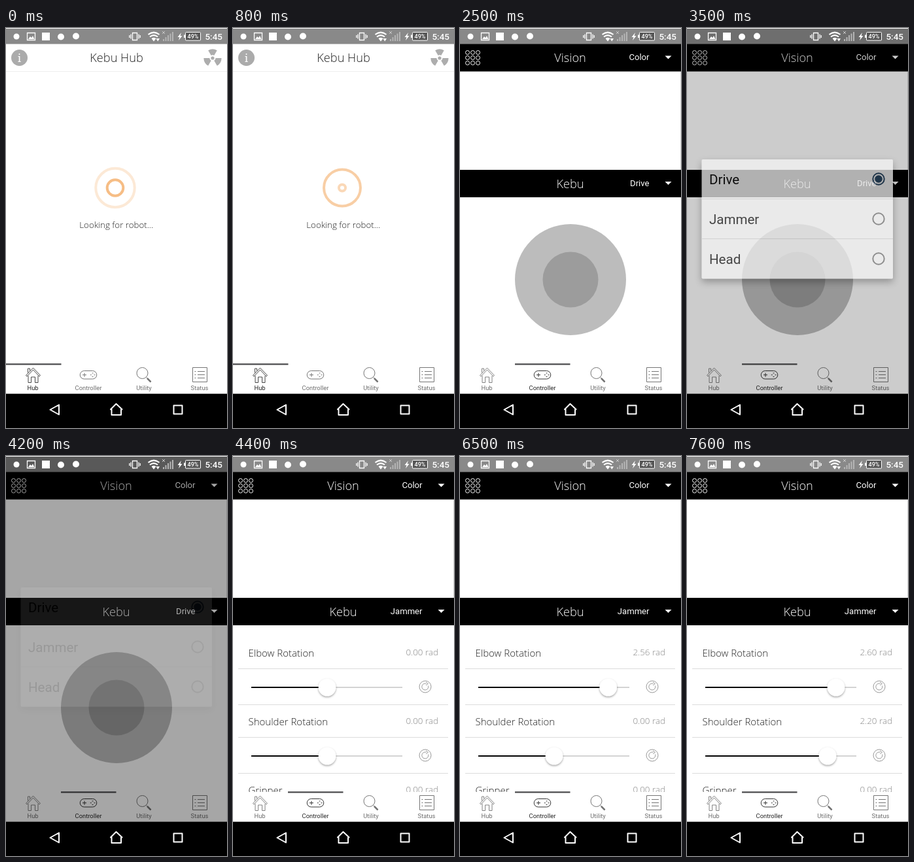
Write an HTML page that moves like this. It is 338x612 px and loops after 7.7 s.

```html
<!DOCTYPE html>
<html lang="en">
<head>
<meta charset="utf-8">
<title>Robot hub</title>
<style>
  html, body { margin: 0; width: 100%; height: 100%; overflow: hidden; background: #fff; }
  svg { display: block; width: 100vw; height: 100vh; }
  text { font-family: "Open Sans", sans-serif; font-weight: 300; font-size: 15px; fill: #222; }
  .roboto { font-family: Roboto, sans-serif; font-weight: 400; font-size: 13.1px; }
  .title { font-size: 18.2px; text-anchor: middle; }
  .value { font-size: 13.4px; fill: #8a8a8a; text-anchor: end; }
  .white { fill: #fff; }
  .end { text-anchor: end; }
  .outline { fill: none; stroke: #fff; }
  .rule { stroke: #dcdcdc; }
  .tab text { font-size: 9.4px; text-anchor: middle; fill: #6c6c6c; }
  .tab path { fill: none; stroke: #757575; }
  .tab.active text { fill: #222; }
  .tab.active path { stroke: #333; }
  #dialog text { font-size: 20.5px; fill: #111; }
</style>
</head>
<body>
<svg viewBox="0 0 338 612">
  <defs>
    <filter id="thumbShadow" x="-50%" y="-50%" width="200%" height="200%">
      <feDropShadow dx="0" dy="1.5" stdDeviation="1.5" flood-opacity=".4"/>
    </filter>
    <filter id="dialogShadow" x="-20%" y="-20%" width="140%" height="150%">
      <feDropShadow dx="0" dy="5" stdDeviation="6" flood-opacity=".4"/>
    </filter>
    <path id="caret" d="M-5 0H5L0 5Z" fill="#fff"/>
    <g id="reset" fill="none" stroke="#999">
      <circle r="9"/>
      <path d="M4.6 -1.5A5 5 0 1 1 1.5 -4.7M1 -7L4.5 -4.6L1.2 -2.2"/>
    </g>
  </defs>

  <rect width="338" height="612" fill="#fff"/>

  <g id="hub">
    <path class="rule" d="M0 66.5H338" style="stroke:#eee"/>
    <circle cx="20.5" cy="45.5" r="12.5" fill="#ababab"/>
    <text x="20.5" y="51.5" class="white" style="font:17px 'Noto Serif',serif;text-anchor:middle">i</text>
    <g id="fan" fill="#adadad" transform="translate(316 46)"><circle r="2.6"/></g>
    <text x="169" y="52" class="title">Kebu Hub</text>
    <g id="search">
      <g fill="none" stroke="#f09134" stroke-width="4">
        <circle class="ripple" cx="167" cy="244.5"/>
        <circle class="ripple" cx="167" cy="244.5"/>
      </g>
      <text x="168.7" y="305.5" text-anchor="middle" style="font-size:13.3px">Looking for robot...</text>
    </g>
    <g id="device">
      <text x="23.5" y="114">Kebu</text>
      <text x="23.5" y="133" style="font-size:13.2px;fill:#444">74:E5:43:21:97:88</text>
      <rect x="227" y="99.5" width="72" height="21" rx="10.5" fill="#ef473a"/>
      <text x="263.5" y="114" text-anchor="middle" class="white" style="font-size:13.3px;font-weight:400">Class 268</text>
      <path class="rule" d="M9 156.5H329M9 194.5H329" style="stroke:#d2d2d2"/>
      <text x="17.8" y="181" fill="#333">Paired</text>
      <text x="173.5" y="181">Connected</text>
      <rect x="145.5" y="166.5" width="18" height="18" rx="3.5" fill="#33cd5f" stroke="#2bac50"/>
      <rect x="301.5" y="166.5" width="18" height="18" rx="3.5" fill="#ef473a" stroke="#c93c31"/>
    </g>
  </g>

  <g id="controller">
    <path d="M0 24H338V66.5H0ZM0 217H338V259H0Z"/>
    <path class="rule" d="M337.5 67V217"/>
    <g id="grid" class="outline"></g>
    <text x="168.5" y="52" class="title white">Vision</text>
    <text x="168.5" y="244.5" class="title white">Kebu</text>
    <text x="289.5" y="49" class="roboto white end">Color</text>
    <text id="mode" x="289.5" y="242" class="roboto white end"></text>
    <use href="#caret" x="318.5" y="42.5"/>
    <use href="#caret" x="318.5" y="235"/>
    <g id="joystick">
      <circle cx="169" cy="385" r="85" fill="#bcbcbc"/>
      <circle cx="169" cy="385" r="42.5" fill="#9c9c9c"/>
    </g>
    <g id="joints"></g>
  </g>

  <g id="tabs">
    <rect y="514" width="338" height="46" fill="#fff"/>
    <g class="tab">
      <path stroke-width=".9" d="M30.5 531.5L41.5 520L52.5 531.5L51 533L41.5 523L32 533ZM34 532V542.5H38.5V534H44.5V542.5H49V532M33.5 527.5V521H36.5V524.5"/>
      <text class="roboto" x="41" y="554">Hub</text>
    </g>
    <g class="tab">
      <path d="M119.5 524.5H132.5A6.25 6.25 0 0 1 132.5 537H119.5A6.25 6.25 0 0 1 119.5 524.5ZM117 530.75H123M120 527.75V533.75M131.5 528H133.5M131.5 533.5H133.5M128.8 530.75H130.8M134.5 530.75H136.5"/>
      <text class="roboto" x="126" y="554">Controller</text>
    </g>
    <g class="tab">
      <path d="M200 528A8.5 8.5 0 1 1 217 528A8.5 8.5 0 1 1 200 528ZM214.5 534.5L221.5 541.5"/>
      <path d="M216 536L221.5 541.5" stroke-width="2.5"/>
      <text class="roboto" x="211" y="554">Utility</text>
    </g>
    <g class="tab">
      <path d="M285.5 519.5H307.5V541.5H285.5ZM288.5 525.5H290.5M293 525.5H304M288.5 530.5H290.5M293 530.5H304M288.5 535.5H290.5M293 535.5H304"/>
      <text class="roboto" x="296" y="554">Status</text>
    </g>
    <rect id="marker" y="513.3" width="84.5" height="2.2" fill="#48484a"/>
  </g>

  <rect y="1" width="338" height="23.5" fill="#898989"/>
  <rect id="dim" y="1" width="338" height="559"/>

  <g id="statusIcons">
    <g fill="#fff">
      <circle cx="16" cy="13" r="4.5"/>
      <rect x="55" y="7" width="12" height="12"/>
      <circle cx="84" cy="13.5" r="5"/>
      <circle cx="107" cy="12.5" r="5"/>
      <path d="M34 17L37 13L39 15L41 12L43.5 17Z"/>
      <path d="M268 7L262.5 14H265.5L264 19L269.5 12H266.5Z"/>
      <path d="M222.5 16Q226 13.5 229.5 16L226 20.5ZM229.5 16H235L232.2 20.5Z"/>
    </g>
    <path class="outline" d="M217.5 10Q226 3.5 234.500 10M220 13.5Q226 8.8 232 13.5" stroke-width="2.2"/>
    <path d="M240 20V17H242V20ZM243.5 20V14H245.5V20ZM247 20V11H249V20ZM250.5 20V8.5H252.5V20ZM254 20V6H256V20Z" fill="#b5b5b5"/>
    <path d="M239 5L243 9M243 5L239 9" stroke="#c8c8c8"/>
    <path class="outline" d="M32.5 7.5H44.5V18.5H32.5ZM193.5 7.5H200.5V18.5H193.5ZM191 9.5V16.5M203 9.5V16.5M188.8 11V15M205.2 11V15" stroke-width="1.3"/>
    <rect x="274.5" y="6.5" width="23" height="12.5" rx="1" fill="#555" stroke="#fff"/>
    <rect x="272" y="10.5" width="2" height="4.5" fill="#fff"/>
    <text x="286" y="16.2" text-anchor="middle" class="roboto white" style="font-size:9px;font-weight:500">49%</text>
    <text x="331" y="18" class="roboto white end" style="font-size:13.5px;font-weight:500">5:45</text>
  </g>

  <g id="dialog">
    <rect x="22.5" y="201" width="292.5" height="182.5" rx="2" fill="#f6f6f6" filter="url(#dialogShadow)"/>
    <path d="M23 261.5H315M23 322.5H315" stroke="#d5d5d5"/>
  </g>

  <rect y="559.6" width="338" height="52.4"/>
  <path class="outline" d="M67.5 584L81 576.5V591.5ZM160 583.5L168.5 575L177.5 583.5H176V592H161.5V583.5ZM256.5 577.5H269.5V590.5H256.5Z" stroke-width="2" stroke-linejoin="round"/>
</svg>

<script>
const LOOP = 7700, STEP = 100;
const $ = id => document.getElementById(id);
const show = (id, on) => { $(id).style.display = on ? '' : 'none'; };
const append = (id, markup) => $(id).insertAdjacentHTML('beforeend', markup);

// Linear interpolation through [time, value] pairs.
function track(t, keys) {
  const next = keys.findIndex(key => key[0] > t);
  if (next < 0) return keys[keys.length - 1][1];
  if (next === 0) return keys[0][1];
  const [t0, v0] = keys[next - 1], [t1, v1] = keys[next];
  return v0 + (v1 - v0) * (t - t0) / (t1 - t0);
}

function bezierEase(x, x1, y1, x2, y2) {
  const curve = (s, a, b) => 3 * s * (1 - s) ** 2 * a + 3 * s * s * (1 - s) * b + s ** 3;
  let low = 0, high = 1;
  for (let i = 0; i < 20; i++) {
    const mid = (low + high) / 2;
    if (curve(mid, x1, x2) < x) low = mid; else high = mid;
  }
  return curve(low, y1, y2);
}

for (const angle of [30, 150, 270]) {
  append('fan', `<path transform="rotate(${angle})" d="M4 -2.3L11.8 -6.8A13.6 13.6 0 0 1 11.8 6.8L4 2.3A4.6 4.6 0 0 0 4 -2.3Z"/>`);
}
for (let i = 0; i < 9; i++) {
  append('grid', `<circle cx="${11.5 + i % 3 * 8}" cy="${37.5 + Math.floor(i / 3) * 8}" r="3"/>`);
}

['Elbow Rotation', 'Shoulder Rotation', 'Gripper'].forEach((name, i) => {
  append('joints', `<g transform="translate(0 ${i * 105})">
    <text x="23.5" y="306.5">${name}</text>
    <text class="value" x="314" y="305">0.00 rad</text>
    <path class="rule" d="M8 325.5H329M8 380.5H329"/>
    <path d="M28 354H259" stroke="#c4c4c4" stroke-width="1.6"/>
    <path class="fill" d="M28 354H144" stroke="#000" stroke-width="2"/>
    <circle class="thumb" cx="144" cy="354" r="13.3" fill="#fff" filter="url(#thumbShadow)"/>
    <use href="#reset" x="294" y="353"/>
  </g>`);
});

['Drive', 'Jammer', 'Head'].forEach((name, i) => {
  const y = 231 + i * 61, color = i ? '#777' : '#2c4a66';
  append('dialog', `<text class="roboto" x="34" y="${y + 8}">${name}</text>
    <circle cx="293" cy="${y}" r="8.7" fill="none" stroke="${color}" stroke-width="2"/>`);
  if (!i) append('dialog', `<circle cx="293" cy="${y}" r="5.8" fill="${color}"/>`);
});

const ripples = document.querySelectorAll('.ripple');
const tabs = document.querySelectorAll('.tab');
const joints = $('joints').children;

function setJoint(joint, radians) {
  const x = 144 + radians * 32.3;
  joint.querySelector('.value').textContent = radians.toFixed(2) + ' rad';
  joint.querySelector('.thumb').setAttribute('cx', x);
  joint.querySelector('.fill').setAttribute('d', `M28 354H${x}`);
}

function render(t) {
  const onController = t >= 2400, jammer = t >= 4400;
  show('hub', !onController);
  show('search', t < 1800);
  show('device', t >= 1800);
  show('controller', onController);
  show('joystick', !jammer);
  show('joints', jammer);
  $('mode').textContent = jammer ? 'Jammer' : 'Drive';

  ripples.forEach((ring, i) => {
    const p = (0.166 + i * 0.5 + Math.min(t, 1000) / 2000) % 1;
    ring.setAttribute('r', 32 * bezierEase(p, 0.1, 0.2, 0.3, 1));
    ring.setAttribute('stroke-opacity', track(p * 3, [[0, 0.2], [1, 1], [2, 0.2], [3, 0]]));
  });

  tabs[0].classList.toggle('active', !onController);
  tabs[1].classList.toggle('active', t >= 2100);
  $('marker').setAttribute('x', onController ? 84 : 0);

  $('dim').style.opacity = track(t, [[3400, 0], [3500, 0.2], [3700, 0.6], [4000, 0.6], [4200, 0.35], [4300, 0.12], [4400, 0]]);
  $('dialog').style.opacity = track(t, [[3400, 0], [3500, 0.72], [3700, 1], [4000, 1], [4100, 0.5], [4200, 0.09], [4300, 0]]);

  setJoint(joints[0], track(t, [[4700, 0], [5200, -3.14], [5500, -1.76], [6300, 0.12], [6500, 2.56], [6800, 2.56], [6900, 2.6]]));
  setJoint(joints[1], track(t, [[7000, 0], [7100, -0.1], [7600, 2.2]]));
}

const start = performance.now();
function frame() {
  const elapsed = (performance.now() - start) % LOOP;
  render(Math.floor(elapsed / STEP) * STEP);
  requestAnimationFrame(frame);
}
frame();
</script>
</body>
</html>
```
